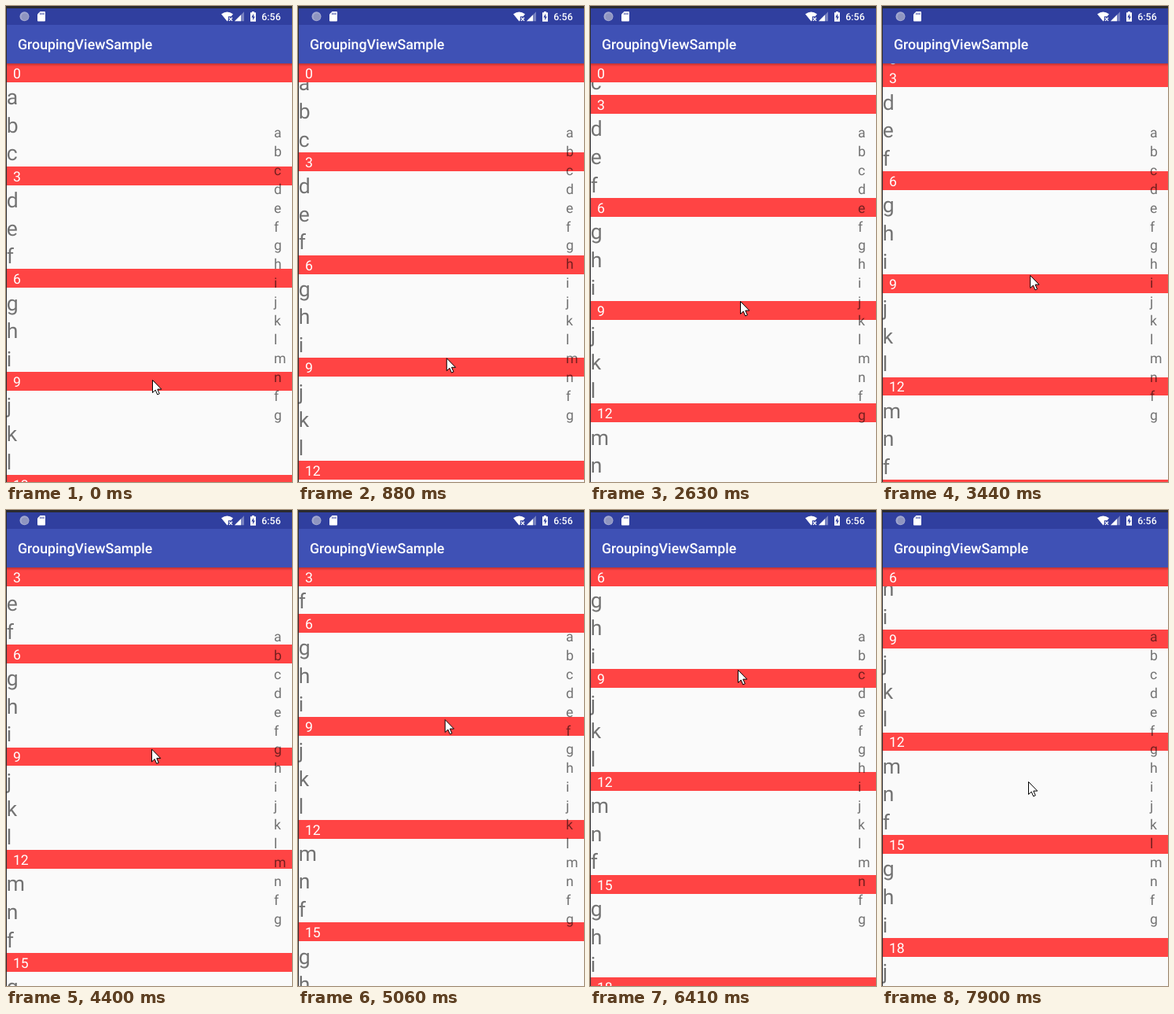
Write an HTML page with a canvas that moves like this. It is 364 px wide and 605 px high and loops after 8000 ms.

```html
<!DOCTYPE html>
<html lang="en">
<head>
<meta charset="utf-8">
<title>Grouped list</title>
<style>
  html, body { margin: 0; width: 100%; height: 100%; overflow: hidden; background: #fafafa; }
  canvas { display: block; width: 364px; height: 605px; }
</style>
</head>
<body>
<canvas></canvas>
<script>
const W = 364, H = 605, LOOP = 8000, STEP = 135, DELAY = 50;
const TOP = 73, HEAD = 23.9, ROW = 35.6, GROUP = HEAD + 3 * ROW;
const ITEMS = 'abcdefghijklmnfghijklmnf', GROUPS = ITEMS.length / 3;
const GREY = 'rgba(0,0,0,.54)', BLUE = '#303f9f', EDGE = '#2b2b2f';

// Key poses of the drag; a negative scroll is the slack before the list moves.
const POSES = [
  { step: 0, x: 187, y: 476, scroll: -10 },
  { step: 11, x: 192, y: 425, scroll: 40.8 },
  { step: 19, x: 192, y: 376, scroll: 90.5 },
  { step: 32, x: 186, y: 304.5, scroll: 163.6 },
  { step: 41, x: 189, y: 237, scroll: 233 },
  { step: 47, x: 189, y: 204, scroll: 262.8 },
  { step: 52, x: 188, y: 163, scroll: 303 },
  { step: 56, x: 186, y: 365, scroll: 303 },
  { step: 58, x: 187, y: 346, scroll: 313.3 },
];

const canvas = document.querySelector('canvas');
const scale = window.devicePixelRatio || 1;
canvas.width = W * scale;
canvas.height = H * scale;
const ctx = canvas.getContext('2d');
ctx.scale(scale, scale);
ctx.textRendering = 'geometricPrecision';

function pose(step) {
  const next = POSES.findIndex(p => p.step > step);
  if (next < 0) return POSES[POSES.length - 1];
  const a = POSES[next - 1], b = POSES[next];
  const k = (step - a.step) / (b.step - a.step);
  const mix = key => a[key] + (b[key] - a[key]) * k;
  return { x: mix('x'), y: mix('y'), scroll: Math.max(0, mix('scroll')) };
}

function rect(x, y, w, h, color) {
  ctx.fillStyle = color;
  ctx.fillRect(x, y, w, h);
}

function text(s, x, y, size, color, weight = 400) {
  ctx.font = `${weight} ${size}px Roboto, sans-serif`;
  ctx.fillStyle = color;
  ctx.fillText(s, x, y);
}

function shape(d, color) {
  ctx.fillStyle = color;
  ctx.fill(new Path2D(d));
}

function disc(x, y, r, color) {
  ctx.beginPath();
  ctx.arc(x, y, r, 0, 7);
  ctx.fillStyle = color;
  ctx.fill();
}

function header(group, y) {
  const top = Math.round(y);
  rect(0, top, W, Math.round(y + HEAD) - top, '#ff4444');
  text(group * 3, 8.9, y + 18.9, 17.66, '#fff');
}

function drawList(scroll) {
  const groupTop = g => TOP + g * GROUP - scroll;
  for (let g = 0; g < GROUPS; g++) {
    for (let r = 0; r < 3; r++)
      text(ITEMS[g * 3 + r], 0.8, groupTop(g) + HEAD + r * ROW + 28.3, 26.5, GREY);
  }
  for (let g = 0; g < GROUPS; g++) header(g, groupTop(g));

  // The pinned header is pushed up by the next one.
  const pinned = Math.floor(scroll / GROUP);
  header(pinned, Math.min(TOP, groupTop(pinned + 1) - HEAD));

  for (let i = 0; i < 16; i++)
    text(ITEMS[i], 341, 167 + i * HEAD, 17.66, GREY);
}

function drawBars() {
  const shadow = ctx.createLinearGradient(0, TOP, 0, TOP + 4);
  shadow.addColorStop(0, 'rgba(0,0,0,.25)');
  shadow.addColorStop(1, 'rgba(0,0,0,0)');
  rect(0, TOP, W, 4, shadow);
  rect(0, 0, W, TOP, '#3f51b5');
  rect(0, 0, W, 24, BLUE);
  rect(0, 0, W, 3, EDGE);
  text('GroupingViewSample', 15, 54.8, 17.8, '#fff', 500);
  text('6:56', 325.3, 18, 12.36, '#fff', 500);
  drawIcons();
}

function drawIcons() {
  disc(23.5, 13.3, 6, '#a3a8d0');
  disc(24, 13.8, 4.5, '#8f95c0');

  // Memory card
  shape('M43.5 7H49a1 1 0 0 1 1 1V18.5a1 1 0 0 1-1 1H41a1 1 0 0 1-1-1V10.5Z', '#fff');
  for (let i = 0; i < 3; i++) rect(43.3 + i * 2.1, 8.6, 1, 2.5, BLUE);

  // Wi-Fi without connection
  shape('M274 10.2Q281.5 4.8 289 10.2L286.6 13.2H282.8V18L281.5 19.5Z', '#fff');
  ctx.strokeStyle = '#fff';
  ctx.lineWidth = 1.3;
  ctx.stroke(new Path2D('M284 14.7L288 18.9M288 14.7L284 18.9'));

  // Signal
  shape('M303 7.3V19.3H291Z', 'rgba(255,255,255,.35)');
  shape('M299 11.3V19.3H291Z', '#fff');

  // Charging battery
  shape('M313 7h3v1.3h2V19.7h-7V8.3h2Z', '#fff');
  shape('M315.2 9.8L312.3 14.6H314.2V18.2L316.9 13.4H315.2Z', BLUE);
}

function drawPointer(x, y) {
  const arrow = new Path2D('M0 0V16L3.7 12.6L6.2 18.4L8.8 17.3L6.3 11.6H11.3Z');
  ctx.save();
  ctx.translate(x - 0.5, y - 0.5);
  ctx.fillStyle = '#fff';
  ctx.fill(arrow);
  ctx.strokeStyle = '#000';
  ctx.lineWidth = 1;
  ctx.stroke(arrow);
  ctx.restore();
}

function frame(now) {
  const step = Math.max(0, Math.floor((now % LOOP - DELAY) / STEP));
  const { x, y, scroll } = pose(step);
  rect(0, 0, W, H, '#fafafa');
  drawList(scroll);
  drawBars();
  rect(0, 0, 1, H, EDGE);
  drawPointer(x, y);
  requestAnimationFrame(frame);
}
requestAnimationFrame(frame);
</script>
</body>
</html>
```
